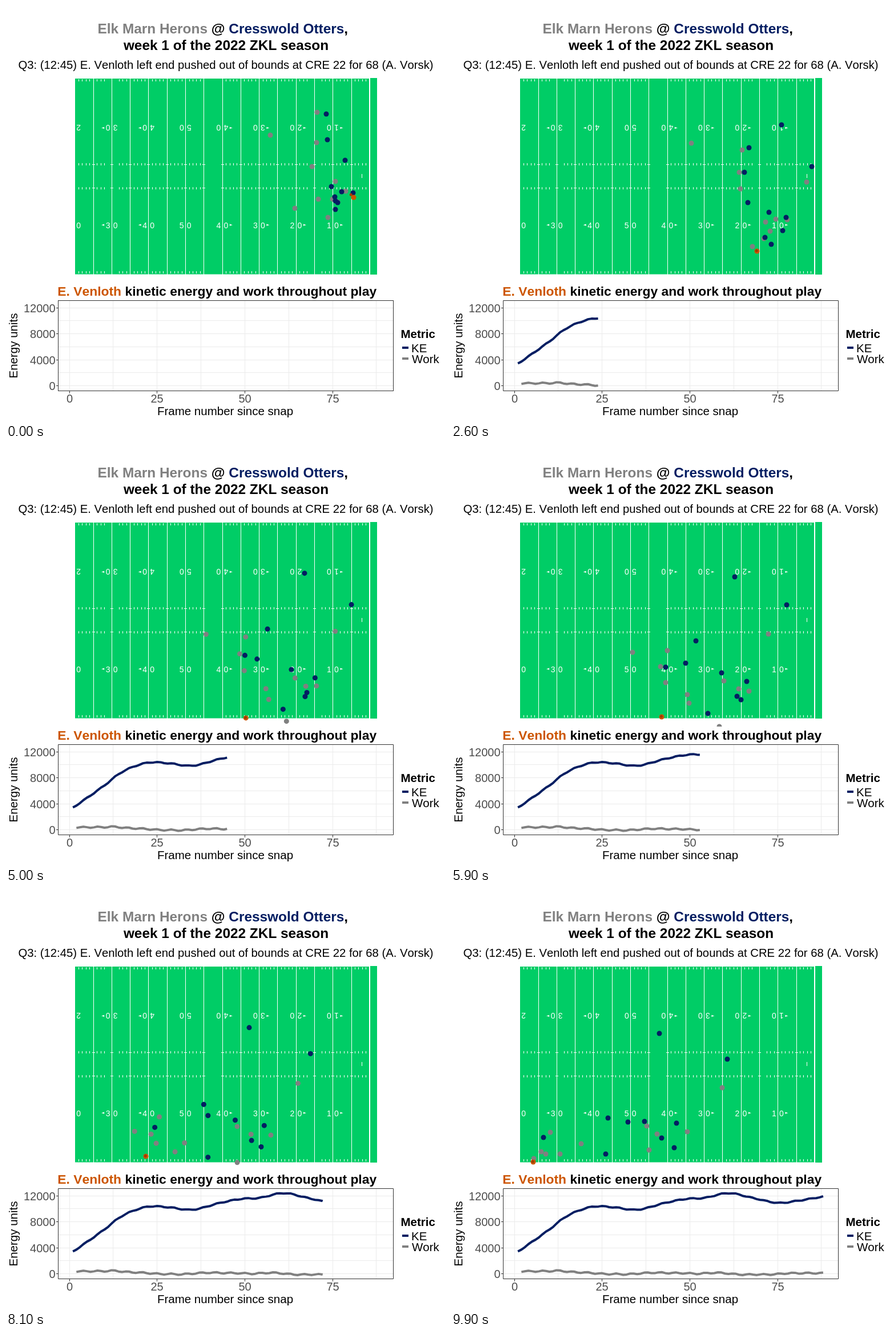
These frames come from a looping animation (769 px wide and 728 px high, 10 s). An HTML page with a canvas:

```html
<!DOCTYPE html>
<html lang="en">
<head>
<meta charset="utf-8">
<title>Play energy</title>
<style>
html, body { margin: 0; width: 100%; height: 100%; overflow: hidden; background: #fff; }
canvas { display: block; }
</style>
</head>
<body>
<canvas id="stage" width="769" height="728"></canvas>
<script>
const ctx = document.getElementById('stage').getContext('2d');
const NAVY = '#041e62', GRAY = '#808080', ORANGE = '#cc5500', BALL = '#a03c00', GREEN = '#00cd66';
const STEP = 100, STEPS = 100, FRAMES = 88;
const GOAL = 637, YARD = 6.455;

// Smooth curve through points [t, v] at uneven times
function curve(points, t) {
  const last = points.length - 1;
  let i = 0;
  while (i < last - 1 && t > points[i + 1][0]) i++;
  const slope = k => {
    const a = points[Math.max(k - 1, 0)], b = points[Math.min(k + 1, last)];
    return (b[1] - a[1]) / (b[0] - a[0]);
  };
  const [t0, v0] = points[i], [t1, v1] = points[i + 1];
  const h = t1 - t0, u = (t - t0) / h, w = 1 - u;
  return v0 * (1 + 2 * u) * w * w + v1 * u * u * (3 - 2 * u)
    + h * u * w * (slope(i) * w - slope(i + 1) * u);
}

// A runner passes the given spots at the given steps
function runner(color, times, ...spots) {
  const [xs, ys] = [0, 1].map(axis => times.map((t, i) => [t, spots[i][axis]]));
  return { color, at: t => [curve(xs, t), curve(ys, t)] };
}

const PACE = [0, 26, 59, 99];
const gray = (...spots) => runner(GRAY, PACE, ...spots);
const navy = (...spots) => runner(NAVY, PACE, ...spots);
const carrier = runner(ORANGE, [0, 17, 26, 41, 59, 81, 99],
  [609, 335], [565, 390], [536, 429], [469, 465], [369, 467], [245, 459], [144, 469]);
const runners = [
  gray([463, 226], [421, 240], [318, 354], [145, 463]),
  gray([545, 186], [510, 252], [379, 351], [174, 417]),
  gray([544, 239], [505, 291], [367, 379], [158, 451]),
  gray([536, 281], [507, 320], [376, 407], [166, 455]),
  gray([577, 307], [569, 373], [478, 404], [343, 406]),
  gray([595, 324], [623, 308], [556, 322], [475, 339]),
  gray([572, 338], [551, 378], [414, 428], [228, 437]),
  gray([547, 338], [548, 407], [417, 443], [191, 455]),
  gray([506, 354], [528, 421], [470, 484], [347, 448]),
  gray([564, 370], [559, 394], [504, 418], [361, 420]),
  gray([581, 343], [589, 374], [522, 422], [414, 416]),
  navy([561, 189], [522, 248], [429, 334], [275, 392]),
  navy([563, 234], [514, 291], [376, 380], [162, 426]),
  navy([594, 270], [579, 208], [497, 222], [365, 244]),
  navy([570, 316], [520, 344], [411, 373], [310, 399]),
  navy([608, 327], [632, 281], [588, 271], [484, 289]),
  navy([588, 325], [557, 361], [474, 390], [339, 398]),
  navy([576, 334], [587, 370], [518, 405], [395, 401]),
  navy([577, 341], [550, 405], [508, 437], [391, 444]),
  navy([581, 344], [581, 393], [501, 431], [369, 427]),
  navy([577, 356], [561, 417], [450, 461], [271, 455]),
  carrier,
];

// Energies as pixel heights; work is the gain in kinetic energy per frame
const SPEED = [[1, 38.5], [5, 55.5], [10, 77.5], [15, 101], [22, 117], [28, 116.5], [35, 112], [43, 124],
  [49, 131], [54, 132.5], [61, 141], [68, 132.5], [75, 124], [80, 127], [88, 135]];
const kinetic = f => curve(SPEED, f) + 0.8 * Math.sin(1.5 * (f - 3.5));
const work = f => kinetic(f) - kinetic(f - 1);

function rect(color, x, y, w, h) {
  ctx.fillStyle = color;
  ctx.fillRect(x, y, w, h);
}

function dot(color, [x, y], r) {
  ctx.fillStyle = color;
  ctx.beginPath();
  ctx.arc(x, y, r, 0, 7);
  ctx.fill();
}

function text(str, x, y, { size = 20.5, bold = false, color = '#000', align = 'left' } = {}) {
  ctx.font = `${bold ? 'bold ' : ''}${size}px "Liberation Sans", Arial, sans-serif`;
  ctx.fillStyle = color;
  ctx.textAlign = align;
  ctx.fillText(str, x, y);
  return ctx.measureText(str).width;
}

function runs(x, y, size, ...parts) {
  for (const [str, color] of parts) x += text(str, x, y, { size, bold: true, color });
}

// Yard number with an arrow on the given side (-1, 0 or 1), upside down in the top row
function yardNumber(x, digits, side, top) {
  ctx.save();
  ctx.translate(x, top ? 212.5 : 384);
  if (top) ctx.rotate(Math.PI);
  [...digits].forEach((d, i) => text(d, i ? 6.5 : -6.5, 5, { size: 14, color: '#fff', align: 'center' }));
  if (side) {
    ctx.scale(top ? -side : side, 1);
    ctx.beginPath();
    ctx.moveTo(13, -2.5);
    ctx.lineTo(18, -0.7);
    ctx.lineTo(13, 0.8);
    ctx.fill();
  }
  ctx.restore();
}

function drawField() {
  rect(GREEN, 121, 127, 517, 342.5);
  rect(GREEN, 638, 126, 12, 344);
  ctx.save();
  ctx.beginPath();
  ctx.rect(121, 126, 529, 344);
  ctx.clip();
  for (let k = 1; k < 80; k++) {
    const x = Math.floor(GOAL + 0.3 - k * YARD);
    // Thin marks drop out around every 27.5 yards
    const lost = Math.abs((k + 12.5 - 13.75) % 27.5 - 13.75 - 12.5 + 12.5) < 1.6;
    if (k % 5 === 0) {
      rect('#fff', x, 127, 1, 343);
      for (const y of [277, 318]) rect('#fff', x - 2, y, 5, 1);
    } else if (!lost) {
      for (const y of [128, 275, 317, 464]) rect('#fff', x, y, 1, 4);
    }
  }
  rect('#fff', 636, 126, 2, 344);
  rect('#fff', 623, 294, 1, 7);
  for (let k = 1; k < 9; k++) {
    for (const top of [true, false]) {
      yardNumber(GOAL - k * 10 * YARD, `${k > 5 ? 10 - k : k}0`, Math.sign(5 - k), top);
    }
  }
  ctx.restore();
}

function drawPlayers(step) {
  for (const { color, at } of runners) dot(color, at(step), 4.5);
  const [x, y] = carrier.at(step);
  const reach = 0.7 + 4 * Math.exp(-step / 6);
  dot(BALL, [x - reach, y - reach], 2.5);
}

const chartX = f => 111 + f * 6.147;
const chartY = h => 664.5 - h;

function drawSeries(height, first, frame, color) {
  if (frame <= first) return;
  ctx.strokeStyle = color;
  ctx.lineWidth = 4;
  ctx.lineJoin = 'round';
  ctx.beginPath();
  for (let f = first; f < frame; f++) ctx.lineTo(chartX(f), chartY(height(f)));
  ctx.lineTo(chartX(frame), chartY(height(frame)));
  ctx.stroke();
}

function drawChart(frame) {
  rect('#fff', 0, 484, 769, 244);
  runs(90.3, 507, 22.87, ['E. Venloth', ORANGE], [' kinetic energy and work throughout play', '#000']);

  const label = { color: '#4d4d4d', size: 20 };
  for (let i = 0; i < 8; i++) {
    const x = Math.floor(chartX(i * 12.5));
    rect('#ebebeb', x, 516, 1, 158);
    if (i % 2 === 0) {
      rect('#333', x, 674, 1, 4);
      text(String(i * 12.5), x + 0.5, 694, { ...label, align: 'center' });
    }
  }
  for (let i = 0; i < 7; i++) {
    const y = Math.floor(chartY(i * 22.75));
    rect('#ebebeb', 91, y, 588, 1);
    if (i % 2 === 0) {
      rect('#333', 88, y, 3, 1);
      text(String(i * 2000), 86.5, y + 8, { ...label, align: 'right' });
    }
  }
  drawSeries(kinetic, 1, frame, NAVY);
  drawSeries(work, 2, frame, GRAY);
  ctx.strokeStyle = '#333';
  ctx.lineWidth = 1;
  ctx.strokeRect(91.5, 515.5, 587, 158);

  text('Frame number since snap', 384, 716, { align: 'center' });
  ctx.save();
  ctx.translate(19.5, 594.5);
  ctx.rotate(-Math.PI / 2);
  text('Energy units', 0, 0, { align: 'center' });
  ctx.restore();

  text('Metric', 691.5, 581, { bold: true });
  rect(NAVY, 694, 596, 11, 4);
  rect(GRAY, 694, 615, 11, 4);
  text('KE', 710, 606);
  text('Work', 711, 625);
}

function draw(now) {
  const step = Math.floor(now / STEP) % STEPS;
  rect('#fff', 0, 0, 769, 728);
  ctx.fontKerning = 'none';
  runs(160.5, 48, 24.4, ['Elk Marn Herons', GRAY], [' @ ', '#000'], ['Cresswold Otters', NAVY], [',', '#000']);
  text('week 1 of the 2022 ZKL season', 385.5, 77, { size: 24.4, bold: true, align: 'center' });
  text('Q3: (12:45) E. Venloth left end pushed out of bounds at CRE 22 for 68 (A. Vorsk)', 385, 110,
    { size: 20.3, align: 'center' });
  drawField();
  drawPlayers(step);
  drawChart(1 + step * (FRAMES - 1) / (STEPS - 1));
}

const start = performance.now();
function tick() {
  draw(performance.now() - start);
  requestAnimationFrame(tick);
}
tick();
</script>
</body>
</html>
```
